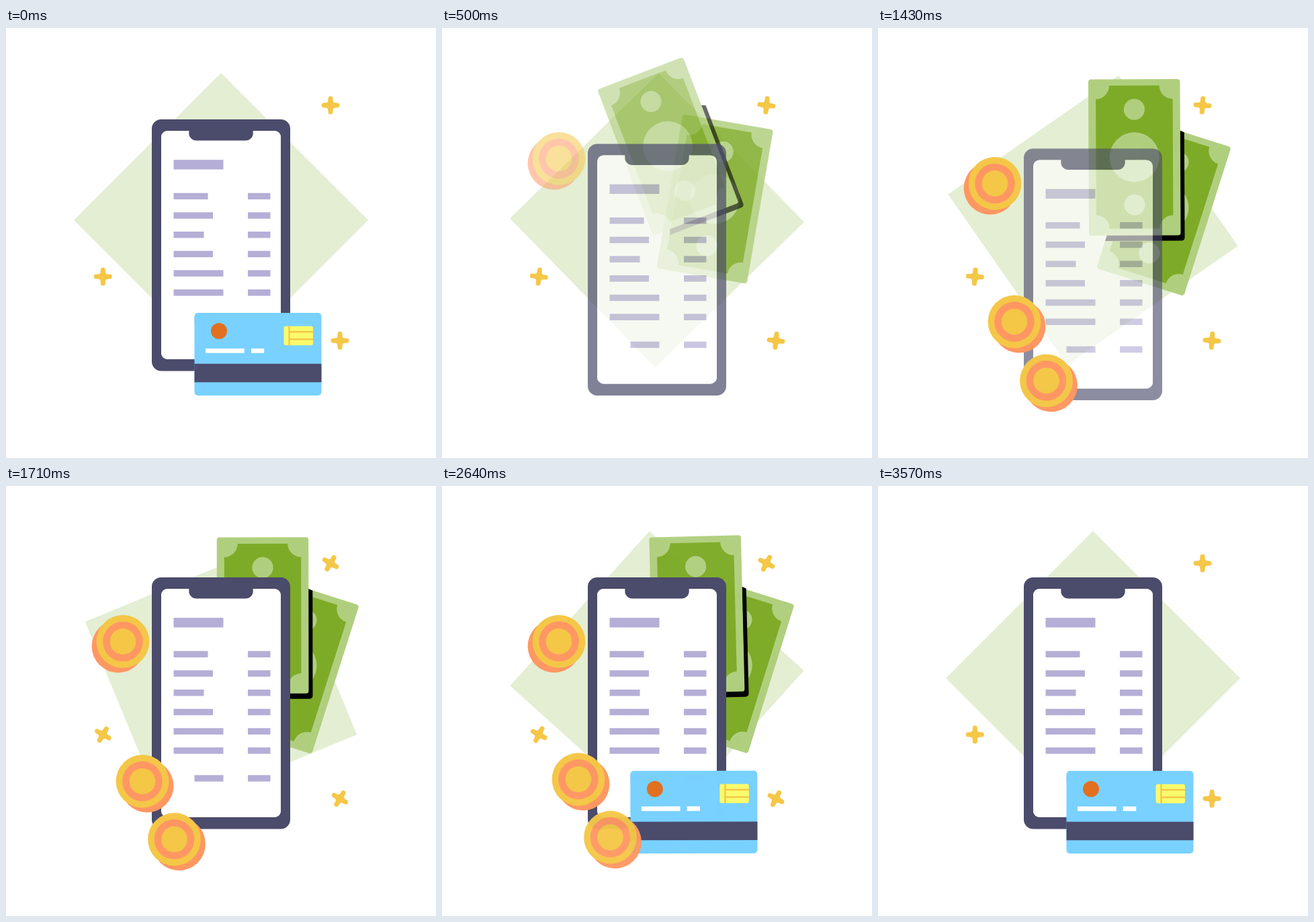
An HTML page that plays this animation: 640 px wide and 640 px high, repeating every 3640 ms.

```html
<!DOCTYPE html>
<html lang="en">
<head>
<meta charset="utf-8">
<title>Payment methods</title>
<style>
html, body { margin: 0; width: 100%; height: 100%; overflow: hidden; background: #fff; }
svg { display: block; width: 100vw; height: 100vh; }
</style>
</head>
<body>
<svg viewBox="0 0 640 640">
  <defs>
    <g id="bill">
      <rect y="-232.5" width="136.5" height="232.5" rx="4" fill="#b0cf7e"/>
      <path fill="#7eab27" d="M31-223H105.5A20 20 0 0 0 125.5-203V-30A20 20 0 0 0 105.5-10H31A20 20 0 0 0 11-30V-203A20 20 0 0 0 31-223Z"/>
      <g fill="#b0cf7e">
        <circle cx="68.2" cy="-187.5" r="15.6"/>
        <circle cx="68.2" cy="-116.5" r="37"/>
        <circle cx="68.2" cy="-45.5" r="15.6"/>
      </g>
    </g>
    <g id="face">
      <circle r="39.4" fill="#f4c747"/>
      <circle r="29.8" fill="#ff9763"/>
      <circle r="19.3" fill="#f4c747"/>
    </g>
    <g id="star" fill="#f5c747" stroke="#f5c747">
      <path d="M0-10V10M-10 0H10" stroke-width="7" stroke-linecap="round"/>
      <path stroke="none" d="M-3.4-8Q-3.2-3.2-8-3.4V3.4Q-3.2 3.2-3.4 8H3.4Q3.2 3.2 8 3.4V-3.4Q3.2-3.2 3.4-8Z"/>
    </g>
  </defs>
  <path id="diamond" fill="#e4eed3" d="M0-219L219 0L0 219L-219 0Z"/>
  <use id="billB" href="#bill"/>
  <g id="billA">
    <path d="M136-156L142.5-153V3Q142.5 8 137.5 8H24L27-1H136Z"/>
    <use href="#bill"/>
  </g>
  <g id="phone">
    <path fill="#4b4b6b" fill-rule="evenodd" d="M231 136H409A14 14 0 0 1 423 150V496A14 14 0 0 1 409 510.5H231A14 14 0 0 1 217 496V150A14 14 0 0 1 231 136ZM240.500 153A9.500 9.500 0 0 0 231 162.500V483.500A9.500 9.500 0 0 0 240.500 493H399.500A9.500 9.500 0 0 0 409 483.500V162.500A9.500 9.500 0 0 0 399.500 153Z"/>
    <rect x="231" y="153" width="178" height="340" rx="9.5" fill="#fff"/>
    <path fill="#4b4b6b" d="M272.300 152H367.700V156.500A11 11 0 0 1 356.700 167.600H283.300A11 11 0 0 1 272.300 156.500Z"/>
    <g id="bars" fill="#b5aed6"></g>
  </g>
  <g id="card">
    <rect x="280.5" y="424" width="189" height="123" rx="5" fill="#79d1ff"/>
    <rect x="280.5" y="499.800" width="189" height="27.400" fill="#4b4b6b"/>
    <circle cx="317" cy="451" r="12" fill="#e2701f"/>
    <rect x="413.500" y="443.700" width="43.500" height="28.500" rx="3" fill="#f8fb6c"/>
    <path d="M421.500 443.700V472.200M421.500 452.300H457M421.500 463.200H457" stroke="#f4c747" stroke-width="2.400"/>
    <path d="M297 477H354.700V483.800H297ZM364.800 477H384.200V483.800H364.800Z" fill="#fff"/>
  </g>
  <g id="coins"></g>
  <g id="stars"></g>
</svg>
<script>
const LOOP = 3640, SPAN = 3570;
const $ = id => document.getElementById(id);
const clamp = v => Math.max(0, Math.min(1, v));

// Receipt rows
const bar = (x, y, w, h = 9.5) => `<rect x="${x}" y="${y}" width="${w}" height="${h}"/>`;
$('bars').innerHTML = bar(249.5, 196.2, 74, 14.3) +
  [51, 58.5, 45, 58.5, 74, 74].map((w, i) => {
    const y = 245.6 + i * 28.7;
    return bar(249.5, y, w) + bar(360, y, 33.5);
  }).join('') + bar(280.5, 430.3, 43) + bar(360, 430.3, 33.5);

// side: where the coin's edge shows; from / to: visible span in ms; k: speed; drift: slow sink
const coins = [
  { x: 174, y: 231.5, side: -7, from: 396, to: 3560, k: .0073, drift: 0 },
  { x: 203, y: 440.4, side: 7, from: 520, to: 3350, k: .0065, drift: 3 },
  { x: 250.5, y: 526, side: 7, from: 769, to: 3140, k: .0065, drift: 0 }
];
$('coins').innerHTML = coins.map(c =>
  `<g><circle cx="${c.side}" cy="7" r="39.4" fill="#ff9763"/><use href="#face"/></g>`).join('');
const stars = [[483, 115], [144.3, 370], [497, 465.3]];
$('stars').innerHTML = '<use href="#star"/>'.repeat(stars.length);

function place(el, x, y, deg = 0, alpha = 1) {
  el.setAttribute('transform', `translate(${x} ${y}) rotate(${deg})`);
  el.setAttribute('opacity', clamp(alpha));
}

// cubic-bezier(1, 0, 0, 1)
function sharp(x) {
  let lo = 0, hi = 1;
  for (let i = 0; i < 30; i++) {
    const s = (lo + hi) / 2;
    if (3 * s * (1 - s) ** 2 + s ** 3 < x) lo = s; else hi = s;
  }
  return lo * lo * (3 - 2 * lo);
}

const smooth = (t, from, to) => {
  const x = clamp((t - from) / (to - from));
  return x * x * (3 - 2 * x);
};

// 1 = fully away, 0 = at rest
const away = (t, from, to, k) =>
  Math.min(1, Math.max(Math.exp(-k * (t - from)), Math.exp(-k * (to - t))));

function draw(t) {
  const e = sharp(t / SPAN);
  place($('diamond'), 320, 286, 90 * e);

  const b = away(t, 216, 3430, .00645);
  place($('billB'), 325 - 37 * b, 357.5, 17.7 - 50 * b, 1 - b);
  const a = away(t, 316, 3400, .00472);
  place($('billA'), 314, 309, -50 * a, 1 - a);

  const p = smooth(t, 305, 785) - smooth(t, 1170, 1650);
  place($('phone'), 0, 100 * p, 0, 1 - p ** 1.2);

  const c = t < 1000 ? clamp((t / 420) ** 3) : Math.min(1, Math.exp(-.006 * (t - 1754)));
  $('card').setAttribute('transform', `rotate(${-20 * c} 280.5 547)`);
  $('card').setAttribute('opacity', 1 - c);

  coins.forEach((o, i) => {
    const q = away(t, o.from, o.to, o.k);
    const sink = o.drift * ((t - 2035) / 605) ** 2;
    place($('coins').children[i], o.x, o.y - 80 * q - sink, 0, 1 - q);
  });

  const spin = 840 * Math.min(e, 1 - e);
  stars.forEach(([x, y], i) => place($('stars').children[i], x, y, spin));
}

const start = performance.now();
function tick() {
  draw(Math.min((performance.now() - start) % LOOP, SPAN));
  requestAnimationFrame(tick);
}
tick();
</script>
</body>
</html>
```
